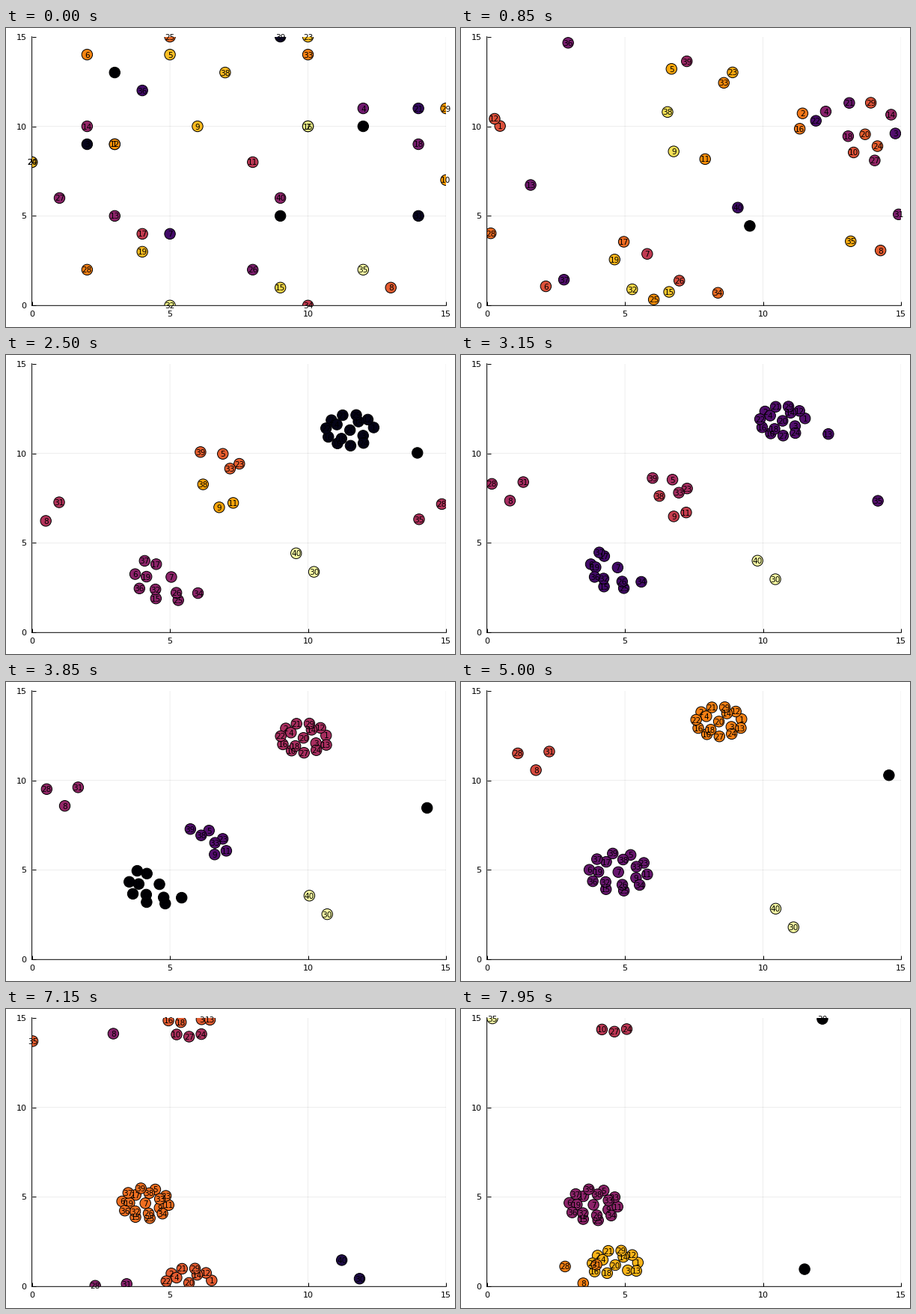
A matplotlib script for the animation above (8 s loop, 600 by 400 pixels).

```python
import numpy as np
import matplotlib.pyplot as plt
from matplotlib.animation import FuncAnimation

plt.rcParams["font.family"] = "DejaVu Sans"
plt.rcParams["path.snap"] = False

BOX = 15
FRAMES = 160
LEFT, RIGHT, TOP, BOTTOM = 34.6, 588.0, 11.6, 371.3
PT = 0.72  # points per pixel at 100 dpi
TIMES = np.array([0, 34, 50, 77, 100, 126, 159], float)

# Lattice cell and colour level of each agent at the start
START = np.array([
    (3, 9, .76), (10, 10, .97), (2, 9, .05), (12, 11, .31), (5, 14, .85),
    (2, 14, .73), (5, 4, .2), (13, 1, .63), (6, 10, .84), (15, 7, .78),
    (8, 8, .5), (3, 9, .76), (3, 5, .38), (2, 10, .4), (9, 1, .9),
    (10, 10, .97), (4, 4, .52), (14, 9, .33), (4, 3, .84), (0, 8, .85),
    (14, 11, .17), (12, 10, 0), (10, 15, .85), (0, 8, .85), (5, 15, .67),
    (8, 2, .34), (1, 6, .38), (2, 2, .72), (15, 11, .78), (9, 5, 0),
    (14, 5, .06), (5, 0, .97), (10, 14, .72), (10, 0, .52), (12, 2, 1),
    (4, 12, .2), (3, 13, 0), (7, 13, .84), (9, 15, .07), (9, 6, .38)])


def ring(ids, radius=0.0, first=0.0):
    """Slots evenly spaced clockwise on a circle, first angle in degrees."""
    angle = np.radians(first) - np.arange(len(ids)) * 2 * np.pi / len(ids)
    return dict(zip(ids, radius * np.column_stack([np.cos(angle), np.sin(angle)])))


# Place of each agent within its settled flock
SLOT = {
    **ring([29, 12, 1, 13, 24, 27, 10, 16, 22, 2, 21], .83, 75),
    **ring([14, 3, 18, 4], .54, 57),
    **ring([20]),
    **ring([39, 5, 23, 11, 34, 25, 15, 36, 6, 37], .88, 101),
    **ring([38, 33, 9, 26, 32, 19, 17], .6, 76),
    **ring([7]),
    **ring([8, 28, 31], .66, 275),
    **ring([30, 40], .61, -58),
    **ring([35]),
}

# Flock centres as {frame: point}, unwrapped across the box edges
flock = {34: (12.52, 10.66), 126: (6.78, 14.31), 159: (4.65, 16.2)}
late = {34: (14.45, 8.76), 50: (13.2, 10.35), 77: (9.9, 12.3)} | {
    t: flock[t] for t in (126, 159)}
held = flock | {159: (4.6, 15.05)}
trio = {34: (.04, 5.5), 126: (2.38, 13.48), 159: (3.43, 15.84)}
meet = {100: (4.76, 4.88), 126: (4.37, 4.74), 159: (3.86, 4.56)}
low = {34: (5.8, 2.6), 50: (5.05, 3.1), 77: (4.62, 4.2)} | meet
west = low | {34: (4.4, 2.3)}
crest = {34: (6.6, 10.3), 77: (5.95, 6.2)} | meet
tail = crest | {34: (6.0, 8.1)}
pair = {34: (9.61, 4.41), 159: (11.83, .45)}
lone = {34: (13.85, 5.05), 159: (15.2, 14.96)}

# How loosely a flock is packed at each time after the start
RIGID = [1, 1, 1, 1, 1, 1]
LOOSE = [1.3, 1.05, 1, 1, 1, 1]
MERGING = [1.9, 1.5, 1.25, 1.2, 1, 1]

# Members, centre, packing, colour level
GROUPS = [
    ([1, 2, 3, 4, 12, 14, 16, 18, 20, 21, 22, 29], flock, LOOSE,
     [.43, .04, .45, .72, .42, .83]),
    ([10, 24, 27], held, LOOSE, [.43, .04, .45, .72, .42, .5]),
    ([13], late, RIGID, [.25, 0, .45, .72, .42, .83]),
    ([8, 28, 31], trio, RIGID, [.63, .48, .4, .58, 0, .72]),
    ([7, 15, 17, 19, 25, 26, 32, 34], low, MERGING, [.83, .38, .01, .29, 1, .38]),
    ([6, 36, 37], west, MERGING, [.47, .38, .01, .29, 1, .38]),
    ([5, 23, 33, 39], crest, MERGING, [.76, .64, .24, .29, 1, .38]),
    ([9, 11, 38], tail, MERGING, [1, .8, .24, .29, 1, .38]),
    ([30, 40], pair, RIGID, [0, 1, 1, 1, .25, 0]),
    ([35], lone, RIGID, [.63, .47, 0, 0, .25, 1]),
]


def centres(track):
    knots = sorted(track)
    xy = np.array([track[t] for t in knots])
    return np.column_stack([np.interp(TIMES[1:], knots, c) for c in xy.T])


PATH = np.empty((len(TIMES), len(START), 2))
TONES = np.empty((len(TIMES), len(START)))
PATH[0], TONES[0] = START[:, :2], START[:, 2]
for members, track, packing, levels in GROUPS:
    for n in members:
        PATH[1:, n - 1] = centres(track) + np.outer(packing, SLOT[n])
        TONES[1:, n - 1] = levels

# Every leg takes the short way round the periodic box
steps = np.diff(PATH, axis=0)
steps -= BOX * np.round(steps / BOX)
PATH[1:] = PATH[0] + np.cumsum(steps, axis=0)
SLOPE = np.gradient(PATH, TIMES, axis=0, edge_order=2)


def state(frame):
    """Positions (Hermite along the path) and colour levels at a frame."""
    k = min(np.searchsorted(TIMES, frame, side="right") - 1, len(TIMES) - 2)
    span = TIMES[k + 1] - TIMES[k]
    s = (frame - TIMES[k]) / span
    ease = s * s * (3 - 2 * s)
    pos = ((1 - ease) * PATH[k] + ease * PATH[k + 1]
           + span * s * (1 - s) ** 2 * SLOPE[k]
           - span * s * s * (1 - s) * SLOPE[k + 1])
    pos = np.where((pos < 0) | (pos > BOX), pos % BOX, pos)
    return pos, (1 - s) * TONES[k] + s * TONES[k + 1]


fig = plt.figure(figsize=(6, 4), dpi=100, facecolor="white")
ax = fig.add_axes([LEFT / 600, 1 - BOTTOM / 400,
                   (RIGHT - LEFT) / 600, (BOTTOM - TOP) / 400])
ax.set(xlim=(0, BOX), ylim=(0, BOX),
       xticks=range(0, 16, 5), yticks=range(0, 16, 5))
ax.set_axisbelow(True)
ax.grid(color="black", alpha=0.1, linewidth=0.5)
ax.tick_params(direction="in", length=5 * PT, width=PT, labelsize=8)
ax.tick_params(axis="x", pad=6.5 * PT)
ax.tick_params(axis="y", pad=7 * PT)
for side in ("top", "right"):
    ax.spines[side].set_visible(False)
for side in ("left", "bottom"):
    ax.spines[side].set_linewidth(PT)

pos, level = state(0)
dots = ax.scatter(pos[:, 0], pos[:, 1], c=level, cmap="inferno", vmin=0, vmax=1,
                  s=(14.4 * PT) ** 2, edgecolors="black", linewidths=PT, zorder=3)
labels = [ax.text(x, y, str(i + 1), fontsize=7.6, ha="center",
                  va="center_baseline", zorder=4)
          for i, (x, y) in enumerate(pos)]


def draw(frame):
    pos, level = state(frame)
    dots.set_offsets(pos)
    dots.set_array(level)
    for label, xy in zip(labels, pos):
        label.set_position(xy)
    return [dots, *labels]


anim = FuncAnimation(fig, draw, frames=FRAMES, interval=50,
                     repeat=True, repeat_delay=0, blit=False)
plt.show()
```
